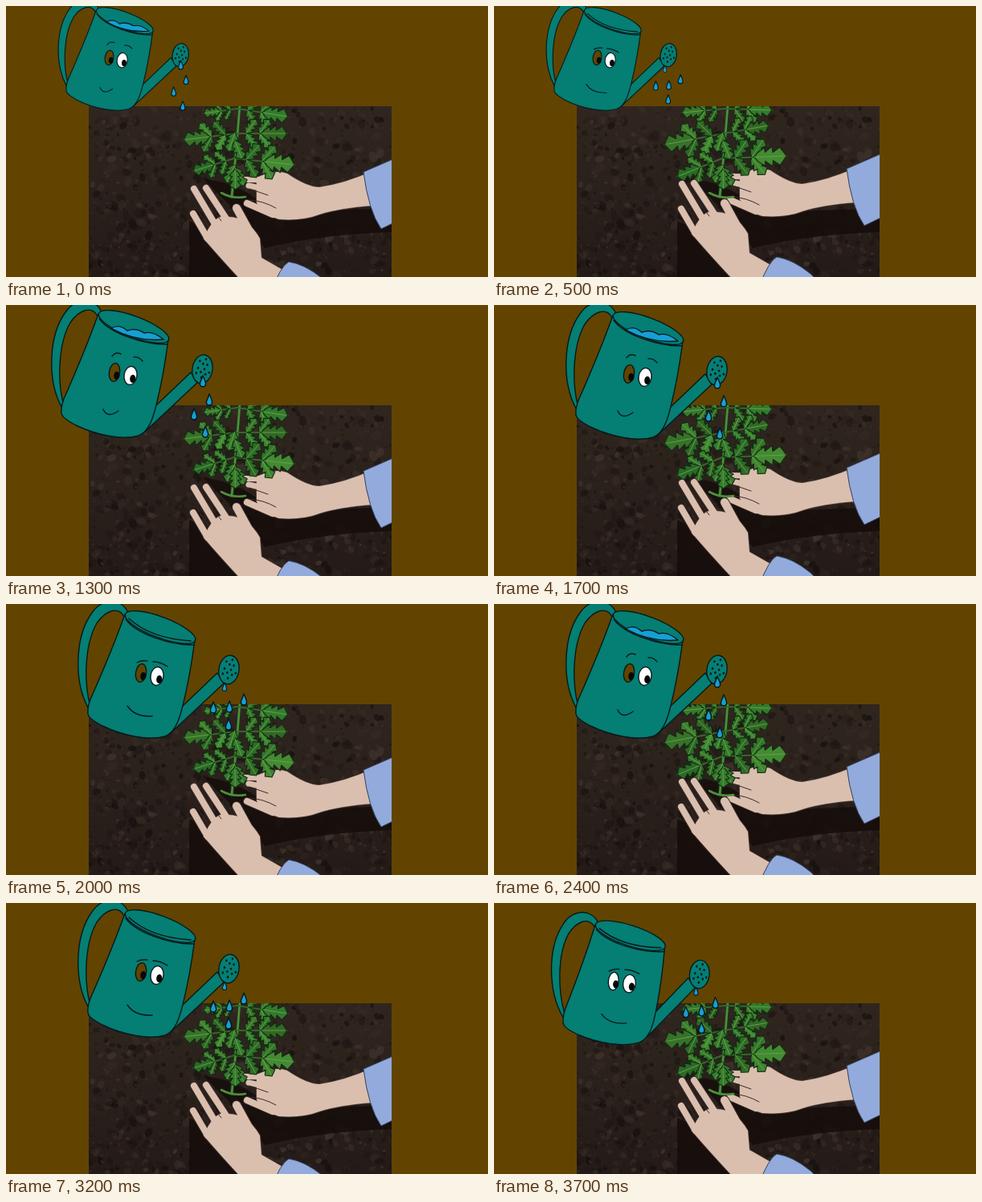
Write an HTML page with a canvas that moves like this. It is 600 px wide and 338 px high and loops after 3800 ms.

```html
<!DOCTYPE html>
<html lang="en">
<head>
<meta charset="utf-8">
<title>Watering a seedling</title>
<style>
html, body { margin: 0; width: 100%; height: 100%; overflow: hidden; background: #624400; }
canvas { display: block; width: 600px; height: 338px; }
</style>
</head>
<body>
<canvas id="stage" width="600" height="338"></canvas>
<script>
const ctx = document.getElementById('stage').getContext('2d');
const LOOP = 3800, STEP = 100, CYCLE = 1000 / 3;
const BROWN = '#624400', TEAL = '#057e74', INK = '#06191a', WATER = '#169fd5';
const SKIN = '#dabfaf', SKIN_EDGE = '#3a2a28', SLEEVE = '#92abdc', SLEEVE_EDGE = '#34405e';

function makeRandom(seed) {
  return () => (seed = (seed * 16807) % 2147483647) / 2147483647;
}

function paint(c, path, fill, stroke, width = 1.4) {
  const p = typeof path === 'string' ? new Path2D(path) : path;
  if (fill) { c.fillStyle = fill; c.fill(p); }
  if (stroke) { c.strokeStyle = stroke; c.lineWidth = width; c.stroke(p); }
}

function oval(c, x, y, rx, ry, turn, fill, stroke) {
  const p = new Path2D();
  p.ellipse(x, y, rx, ry, turn, 0, Math.PI * 2);
  paint(c, p, fill, stroke);
}

function moved(c, [x, y], draw) {
  c.save();
  c.translate(x, y);
  draw();
  c.restore();
}

function drawSoil(c) {
  const rnd = makeRandom(4711);
  const ground = c.createLinearGradient(0, 125, 0, 338);
  ground.addColorStop(0, '#30261f');
  ground.addColorStop(1, '#241b18');
  c.fillStyle = ground;
  c.fillRect(103, 125, 377, 213);
  const tones = ['#130d0c', '#43362f', '#1d1513', '#3a2f28'];
  for (let i = 0; i < 1300; i++) {
    const r = 0.8 + 4.5 * rnd() ** 3;
    c.globalAlpha = 0.2 + rnd() * 0.5;
    oval(c, 103 + rnd() * 377, 125 + rnd() * 213, r * 1.4, r, rnd() * 3, tones[i % 4]);
  }
  c.globalAlpha = 0.85;
  paint(c, 'M228 268 L300 300 L330 338 H228Z', '#160d0b');
  paint(c, 'M245 215 Q300 222 330 258 L480 252 V282 Q390 285 322 302 L280 250Z', '#160d0b');
  c.globalAlpha = 1;
}

// Leaflet with three pointed lobes on each side
function leaflet(c, x, y, angle, len, fill) {
  const side = [];
  for (let s = 0.1; s < 0.75; s += 0.24) {
    const w = len * 0.31 * Math.sin(Math.PI * (0.3 + 0.6 * s));
    side.push([len * s, w * 0.45], [len * (s + 0.22), w]);
  }
  const outline = [[0, 0], ...side, [len, 0], ...side.reverse().map(([u, v]) => [u, -v])];
  const vein = new Path2D(`M0 0 H${len * 0.9}`);
  c.save();
  c.translate(x, y);
  c.rotate(angle);
  paint(c, `M${outline.join('L')}Z`, fill, '#122b12', 1.1);
  paint(c, vein, null, '#6aab4a', 0.8);
  c.restore();
}

// Twig with leaflet pairs and one leaflet at its end
function frond(c, x, y, tipX, tipY, rnd) {
  const dx = tipX - x, dy = tipY - y, len = Math.hypot(dx, dy), angle = Math.atan2(dy, dx);
  const tone = () => `hsl(${108 + rnd() * 8}, 46%, ${26 + rnd() * 11}%)`;
  paint(c, `M${x} ${y} L${tipX} ${tipY}`, null, '#2f6a28', 2);
  for (const s of [0.2, 0.46]) {
    for (const turn of [-0.95, 0.95]) {
      leaflet(c, x + dx * s, y + dy * s, angle + turn, len * 0.34, tone());
    }
  }
  leaflet(c, x + dx * 0.5, y + dy * 0.5, angle, len * 0.5, tone());
}

function drawPlant(c, tips) {
  const rnd = makeRandom(99);
  paint(c, 'M291 124 Q287 180 281 238', null, '#183c18', 4.5);
  paint(c, 'M291 124 Q287 180 281 238 M268 233 Q282 241 298 238', null, '#4f8f3b', 2.6);
  tips.forEach(([x, y], i) => frond(c, 288 - (i >> 1) * 2, 128 + (i >> 1) * 31, x, y, rnd));
  for (const [y, turn] of [[158, 1.9], [168, 1.2], [198, 2], [202, 1.1], [204, 1.55]]) {
    leaflet(c, 285, y, turn, 25, '#367a2d');
  }
}

// Palm and round fingers joined under one outline
function drawHand(c, palm, fingers) {
  const pass = (color, grow) => {
    paint(c, palm, color, color, grow || 0.2);
    for (const [x, y, u, v, w] of fingers) paint(c, `M${x} ${y} L${u} ${v}`, null, color, w + grow);
  };
  pass(SKIN_EDGE, 2);
  pass(SKIN, 0);
}

function drawRightHand(c) {
  drawHand(c, 'M312 214 Q335 203 350 209 Q375 226 390 226 Q420 222 456 206 V249 Q415 252 390 260 Q370 268 340 266 Q318 260 312 245Z',
    [[281, 216, 325, 217, 7], [302, 224, 325, 229, 7], [300, 246, 332, 260, 8]]);
  paint(c, 'M303 228 L326 236 M303 242 Q320 243 336 252', null, SKIN_EDGE, 1);
  paint(c, 'M445 207 L500 183 V262 L467 278 Q451 255 445 207Z', SLEEVE, SLEEVE_EDGE, 1);
}

function drawLeftHand(c) {
  drawHand(c, 'M246 290 Q260 258 275 263 Q300 262 316 290 L318 314 L346 330 L340 350 H300 Q270 318 246 290Z',
    [[234, 228, 260, 272, 8], [249, 227, 276, 268, 8], [233, 259, 251, 290, 8], [287, 252, 304, 283, 10]]);
  paint(c, 'M252 248 L268 268 M238 254 L252 275', null, SKIN_EDGE, 1);
  paint(c, 'M330 356 Q342 324 352 319 Q372 322 394 340 L410 356Z', SLEEVE, SLEEVE_EDGE, 1);
}

const POSES = [
  {
    right: [0, 0], left: [0, 0],
    tips: [[246, 134], [351, 138], [221, 167], [350, 159], [233, 206], [359, 198]]
  },
  {
    right: [-6, -4], left: [0, -6],
    tips: [[234, 133], [346, 130], [212, 173], [342, 149], [228, 213], [364, 187]]
  }
];

function makeScene(pose) {
  const layer = document.createElement('canvas');
  layer.width = 600;
  layer.height = 338;
  const c = layer.getContext('2d');
  c.lineJoin = c.lineCap = 'round';
  c.beginPath();
  c.rect(103, 125, 377, 213);
  c.clip();
  drawSoil(c);
  moved(c, pose.right, () => drawRightHand(c));
  drawPlant(c, pose.tips);
  moved(c, pose.left, () => drawLeftHand(c));
  return layer;
}

const scenes = POSES.map(makeScene);

function drawDrop(c, x, y, size = 1) {
  c.save();
  c.translate(x, y);
  c.scale(size, size);
  paint(c, 'M0 -8 C2 -3 4 0 3.6 3 C3 7 -3 7 -3.6 3 C-4 0 -1 -3 0 -8Z', WATER, INK);
  c.restore();
}

function drawEye(c, x, y, rx, fill) {
  oval(c, x, y, rx, 11.5, 0.15, fill, INK);
  oval(c, x + 2.8, y + 4, 3.6, 5, 0.1, '#080808');
}

function drawCan(c, matrix, full, leftEye) {
  c.save();
  c.transform(...matrix);
  c.lineJoin = c.lineCap = 'round';

  paint(c, 'M102 129 C84 95 86 40 107 11 C120 -8 144 -8 152 11 L147 16 C140 2 124 8 113 24 C98 50 97 95 104 124Z', TEAL, INK);
  paint(c, 'M217 130 L263 86 L271 99 L206 160Z', TEAL, INK);
  paint(c, 'M148 13 Q132 58 105 119 C98 139 101 142 120 152 C145 164 177 171 198 165 C211 160 216 143 220 127 Q229 91 235 45Z', TEAL, INK);
  oval(c, 192, 29, 46.5, 13, 0.36, TEAL, INK);
  paint(c, 'M149 19 C162 37 205 52 234 51', null, INK);
  paint(c, full ? 'M164 31 Q174 25 184 34 Q195 30 205 37 Q216 34 229 45 Q195 48 164 31Z'
    : 'M153 18 Q180 43 230 46', full && WATER, INK);

  oval(c, 277.5, 82, 12.5, 18, 0.16, TEAL, INK);
  for (let i = 0; i < 11; i++) {
    const a = i * 2.4, r = Math.sqrt((i + 0.5) / 11);
    oval(c, 278 + Math.cos(a) * r * 9.5, 82 + Math.sin(a) * r * 14, 1.3, 1.6, 0, INK);
  }

  drawEye(c, 168, 86, 6.5, leftEye);
  drawEye(c, 188, 90, 8, '#fff');
  paint(c, full ? 'M165 66 Q169 60 176 63 M192 67 Q198 66 203 72 M154 132 Q159 144 173 134'
    : 'M163 73 Q168 70 176 71 M183 72 Q192 72 201 78 M151 127 Q160 141 182 140', null, INK);

  const drops = full
    ? [[278, 98], [286, 121], [267, 139], [281, 161]]
    : [[272, 104, 0.75], [258, 130], [278, 129], [296, 120], [277, 151]];
  drops.forEach(d => drawDrop(c, ...d));
  c.restore();
}

// The can fills and empties with the hands, or against them
const SHOTS = [
  { from: 0, matrix: [0.81, 0, 0, 0.81, -7.6, -5.2], eye: BROWN },
  { from: 600, matrix: [1, 0, 0, 1, -33, -2], eye: BROWN },
  { from: 1500, matrix: [1, 0, 0, 1, 0, 0], eye: BROWN, against: true },
  { from: 3400, matrix: [0.979, -0.043, 0.043, 0.979, -19.4, 20.6], eye: '#fff' }
];

function render(t) {
  const pressed = (t - 20 + CYCLE) % CYCLE < CYCLE / 2;
  const shot = SHOTS.filter(s => s.from <= t).pop();
  ctx.fillStyle = BROWN;
  ctx.fillRect(0, 0, 600, 338);
  ctx.drawImage(scenes[pressed ? 1 : 0], 0, 0);
  drawCan(ctx, shot.matrix, pressed === Boolean(shot.against), shot.eye);
}

const start = performance.now();
function tick() {
  const t = (performance.now() - start) % LOOP;
  render(Math.floor(t / STEP) * STEP);
  requestAnimationFrame(tick);
}
tick();
</script>
</body>
</html>
```
